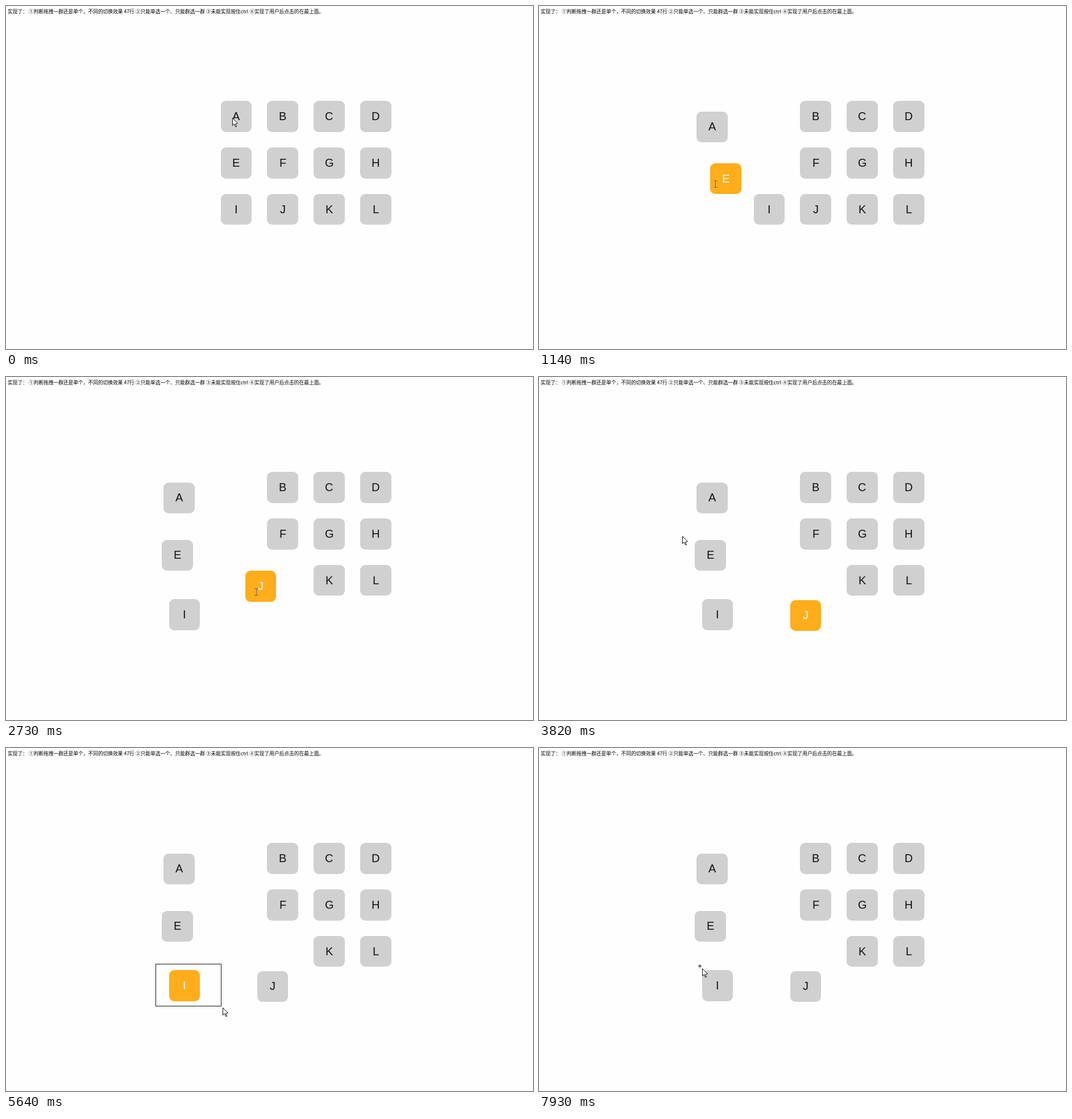
An HTML page with a canvas for the animation above (8000 ms loop, 927x604 px).

```html
<!DOCTYPE html>
<html lang="zh-CN">
<head>
<meta charset="utf-8">
<title>拖拽</title>
<style>
html, body { margin: 0; width: 100%; height: 100%; overflow: hidden; background: #fefefe; }
canvas { display: block; }
</style>
</head>
<body>
<canvas id="stage" width="927" height="604"></canvas>
<script>
const ctx = document.getElementById('stage').getContext('2d');
const LOOP = 8000, STEP = 135, SIZE = 54.5, PITCH = 81.8;
const GREY = '#d0d0d0', ORANGE = '#ffad1a';
const NOTE = '实现了： ①判断拖拽一群还是单个，不同的切换效果 47行 ②只能单选一个、只能群选一群 ' +
  '③未能实现按住ctrl ④实现了用户后点击的在最上面。';

// Pointer gestures: time, x, y and an action (tile to press, lasso or up)
const path = [
  [0, 398, 197], [270, 398, 197, 'A'], [720, 297.6, 215.5, 'up'],
  [870, 387, 286, 'E'], [1260, 283.7, 323.6, 'up'],
  [1620, 395, 360, 'I'], [1920, 304.1, 420.2, 'up'], [2070, 399, 383],
  [2460, 479, 368, 'J'], [2910, 330, 408], [3370, 461.2, 429.7, 'up'],
  [3820, 252, 280], [4100, 4, 15], [4530, 290, 320, 'E'], [4650, 290, 320, 'up'],
  [5010, 259, 376, 'lasso'], [5640, 381, 457], [6180, 524, 481, 'up'],
  [6450, 495, 476], [6750, 306, 425], [7030, 351, 416], [7300, 351, 416],
  [7800, 277, 378, 'lasso'], [7930, 287, 388], [LOOP, 287, 388, 'up']
].map(([t, x, y, act]) => ({ t, x, y, act }));

const acts = path.filter(p => p.act);
const presses = acts.filter(p => p.act !== 'up')
  .map(p => ({ ...p, end: acts[acts.indexOf(p) + 1].t }));

const tiles = [...'ABCDEFGHIJKL'].map((id, i) => ({
  id, x: 377.6 + PITCH * (i % 4), y: 167.25 + PITCH * Math.floor(i / 4)
}));

function segment(t) {
  const i = path.findIndex(p => p.t > t);
  return i < 0 ? path.slice(-2) : [path[i - 1], path[i]];
}

// Each gesture plays as a whole number of equal steps
function snap(t) {
  const [a, b] = segment(t), span = b.t - a.t;
  const n = Math.max(1, Math.round(span / STEP));
  return a.t + Math.floor((t - a.t) / span * n) / n * span;
}

function pointer(t) {
  const [a, b] = segment(t);
  const u = (t - a.t) / (b.t - a.t), k = u * u * (3 - 2 * u);
  return { x: a.x + (b.x - a.x) * k, y: a.y + (b.y - a.y) * k };
}

function place(tile, t) {
  const pos = { ...tile, z: 0 };
  for (const p of presses) {
    if (p.act !== tile.id || p.t > t) continue;
    const at = pointer(Math.min(t, p.end));
    pos.x += at.x - p.x;
    pos.y += at.y - p.y;
    pos.z = p.t;
  }
  return pos;
}

function lassoBox(press, t) {
  if (!press || press.act !== 'lasso' || t >= press.end) return null;
  const at = pointer(t), x = press.x + 4, y = press.y + 4;
  return { x, y, w: Math.round(at.x - 2 - x), h: Math.round(at.y - 2 - y) };
}

const hits = (b, p) => b && p.x < b.x + b.w && p.x + SIZE > b.x &&
  p.y < b.y + b.h && p.y + SIZE > b.y;

function drawTile(p, on) {
  const x = Math.round(p.x), y = Math.round(p.y);
  ctx.fillStyle = on ? ORANGE : GREY;
  ctx.beginPath();
  ctx.roundRect(x, y, Math.round(p.x + SIZE) - x, Math.round(p.y + SIZE) - y, 9);
  ctx.fill();
  ctx.fillStyle = on ? '#fff' : '#111';
  ctx.font = '20px "Liberation Sans", Arial, sans-serif';
  const left = p.x + (SIZE - ctx.measureText(p.id).width) / 2;
  ctx.fillText(p.id, Math.round(left), Math.floor(p.y + 34.2));
}

function drawCursor({ x, y }, beam) {
  ctx.save();
  ctx.translate(Math.floor(x) + 0.5, Math.floor(y) + 0.5);
  ctx.strokeStyle = beam ? '#666' : '#111';
  ctx.fillStyle = '#fff';
  const shape = new Path2D(beam
    ? 'M-3-6H3M0-6V6M-3 6H3'
    : 'M0 0V13L3 10L5 15H7L5 10L9 9Z');
  if (!beam) ctx.fill(shape);
  ctx.stroke(shape);
  ctx.restore();
}

function draw(t) {
  ctx.fillStyle = '#fefefe';
  ctx.fillRect(0, 0, 927, 604);
  ctx.fillStyle = '#000';
  ctx.font = '8.73px "Noto Sans CJK SC", "Noto Sans CJK", sans-serif';
  ctx.fillText(NOTE, 3, 13);

  // A press shows one step after it happens
  const press = presses.filter(p => p.t < t).pop();
  const box = lassoBox(press, t);
  tiles.map(p => place(p, t)).sort((a, b) => a.z - b.z)
    .forEach(p => drawTile(p, press && p.id === press.act || hits(box, p)));

  if (box) {
    ctx.strokeStyle = '#111';
    ctx.strokeRect(box.x + 0.5, box.y + 0.5, box.w - 1, box.h - 1);
  }
  drawCursor(pointer(t), press && press.act !== 'lasso' && t <= press.end);
}

const begin = performance.now();
function tick() {
  draw(snap((performance.now() - begin) % LOOP));
  requestAnimationFrame(tick);
}
tick();
</script>
</body>
</html>
```
